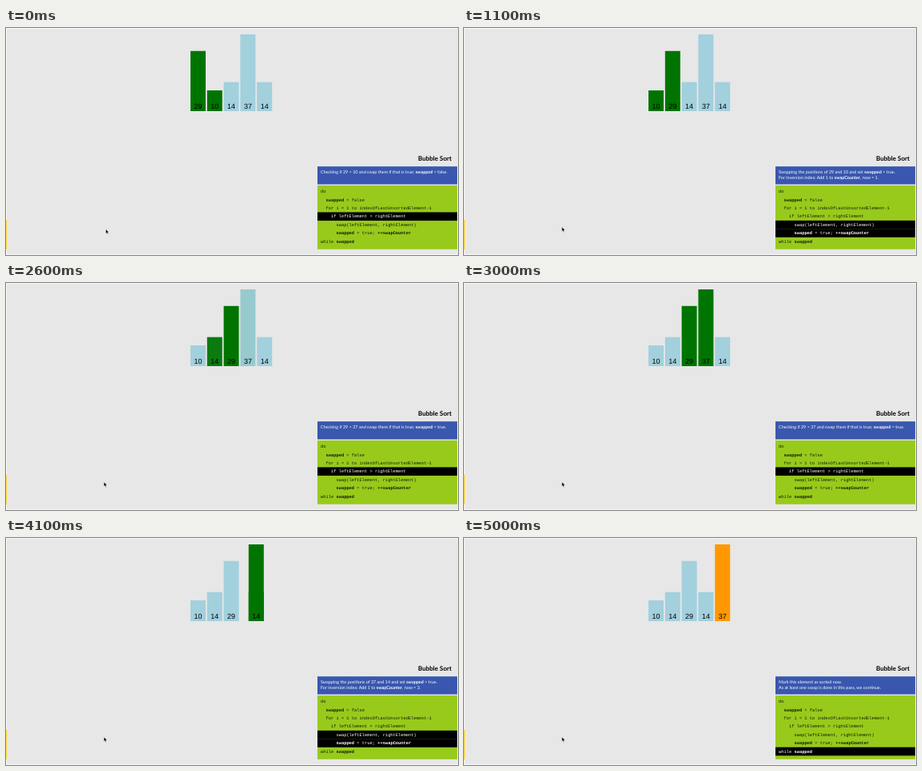
Animation of 566 by 284 pixels, one loop 5.3 s. Source, as an HTML page:

```html
<!DOCTYPE html>
<html lang="en">
<head>
<meta charset="utf-8">
<title>Bubble Sort</title>
<style>
  html, body { margin: 0; width: 100%; height: 100%; overflow: hidden; background: #f8f8f8; }
  svg { display: block; width: 566px; height: 284px; text-rendering: geometricPrecision; }
  .num { font: 9px "Liberation Sans", Arial, sans-serif; text-anchor: middle; }
  .title { font: bold 8px Lato, sans-serif; text-anchor: end; }
  .msg { font: 5.44px Lato, sans-serif; fill: #fff; }
  .code { font: 5.4px "Liberation Mono", "Courier New", monospace; white-space: pre; }
  .b { font-weight: bold; }
</style>
</head>
<body>
<svg id="stage" viewBox="0 0 566 284">
  <rect x="1" y="1" width="564.5" height="282" fill="#e7e7e7"/>
  <rect y="240" width="1" height="37" fill="#fbd536"/>
  <g id="bars"></g>
  <text class="title" x="558" y="165.8">Bubble Sort</text>
  <rect x="390" y="173.2" width="175" height="22.4" fill="#3957ae"/>
  <text class="msg" id="line0" x="394" y="182.4"></text>
  <text class="msg" id="line1" x="394" y="189.4"></text>
  <rect x="390" y="197" width="175" height="79.8" fill="#98ca1b"/>
  <g id="code"></g>
  <path id="cursor" d="M0 0V5.6L1.3 4.4L2.2 6.4L3.1 6L2.2 4.1H3.9Z" fill="#000" stroke="#fff" stroke-width=".4"/>
</svg>
<script>
const LOOP = 5300, TICK = 100, MOVE = 500, FADE = 350;
const BLUE = [162, 208, 221], GREEN = [0, 116, 0], ORANGE = [255, 152, 0];
const VALUES = [29, 10, 14, 37, 14];
const CODE = [
  'do',
  '  *swapped* = false',
  '  for i = 1 to indexOfLastUnsortedElement-1',
  '    if leftElement > rightElement',
  '      swap(leftElement, rightElement)',
  '      *swapped* = true; *++swapCounter*',
  'while *swapped*'
];

const check = (at, a, b, active, order, flag) => ({
  at, active, order, rows: [3],
  text: [`Checking if ${a} > ${b} and swap them if that is true; *swapped* = ${flag}.`, '']
});
const swap = (at, a, b, active, order, count) => ({
  at, active, order, rows: [4, 5],
  text: [`Swapping the positions of ${a} and ${b} and set *swapped* = true.`,
         `For inversion index: Add 1 to *swapCounter*, now = ${count}.`]
});

// order[i] is the slot of bar i; active lists the highlighted bars
const STEPS = [
  check(0, 29, 10, [0, 1], [0, 1, 2, 3, 4], false),
  swap(490, 29, 10, [0, 1], [1, 0, 2, 3, 4], 1),
  check(1130, 29, 14, [0, 2], [1, 0, 2, 3, 4], true),
  swap(1810, 29, 14, [0, 2], [2, 0, 1, 3, 4], 2),
  check(2510, 29, 37, [0, 3], [2, 0, 1, 3, 4], true),
  check(3210, 37, 14, [3, 4], [2, 0, 1, 3, 4], true),
  swap(3850, 37, 14, [3, 4], [2, 0, 1, 4, 3], 3),
  { at: 4610, active: [], sorted: 3, order: [2, 0, 1, 4, 3], rows: [6],
    text: ['Mark this element as sorted now.', 'As at least one swap is done in this pass, we continue.'] }
];

const $ = id => document.getElementById(id);
function add(parent, tag, attrs) {
  const el = document.createElementNS('http://www.w3.org/2000/svg', tag);
  for (const k in attrs) el.setAttribute(k, attrs[k]);
  return parent.appendChild(el);
}

// *word* becomes bold
function setText(el, str) {
  el.textContent = '';
  str.split('*').forEach((part, i) => {
    if (part) add(el, 'tspan', i % 2 ? { class: 'b' } : {}).textContent = part;
  });
}

const bars = VALUES.map(v => {
  const g = add($('bars'), 'g', {}), h = v * 96 / 37;
  const rect = add(g, 'rect', { width: 19, height: h, y: 104 - h });
  add(g, 'text', { class: 'num', x: 9.5, y: 101 }).textContent = v;
  return { g, rect };
});

const rows = CODE.map((src, i) => {
  const y = 199.2 + i * 10.42;
  const back = add($('code'), 'rect', { x: 390, y, width: 175, height: 10.6 });
  const indent = src.search(/\S/);
  const text = add($('code'), 'text', { class: 'code', x: 394 + indent * 3.24, y: y + 6.9 });
  setText(text, src.trim());
  return { back, text };
});

const clamp = x => Math.min(1, Math.max(0, x));
const ease = x => x < .5 ? 4 * x ** 3 : 1 - (2 - 2 * x) ** 3 / 2;
const mix = (a, b, p) => a + (b - a) * p;
const color = (step, i) => step.sorted === i ? ORANGE : step.active.includes(i) ? GREEN : BLUE;

let shown = -1;
function showStep(k) {
  if (k === shown) return;
  shown = k;
  const step = STEPS[k];
  step.text.forEach((s, i) => setText($('line' + i), s));
  rows.forEach(({ back, text }, i) => {
    const on = step.rows.includes(i);
    back.setAttribute('fill', on ? '#000' : 'none');
    text.setAttribute('fill', on ? '#fff' : '#10180a');
  });
}

function draw(now) {
  const t = Math.floor(now % LOOP / TICK) * TICK;
  let k = STEPS.length - 1;
  while (STEPS[k].at > t) k--;
  showStep(k);
  const step = STEPS[k], prev = STEPS[Math.max(0, k - 1)];
  const move = ease(clamp((t - step.at) / MOVE));
  const fade = ease(clamp((t - step.at) / FADE));
  bars.forEach(({ g, rect }, i) => {
    const x = 231 + 20.8 * mix(prev.order[i], step.order[i], move);
    const from = color(prev, i), to = color(step, i);
    g.setAttribute('transform', `translate(${x} 0)`);
    rect.setAttribute('fill', `rgb(${from.map((c, j) => Math.round(mix(c, to[j], fade)))})`);
  });
  $('cursor').setAttribute('transform', t < 100 ? 'translate(125 251.7)' : 'translate(122.6 249)');
}

const start = performance.now();
function frame() {
  draw(performance.now() - start);
  requestAnimationFrame(frame);
}
frame();
</script>
</body>
</html>
```
